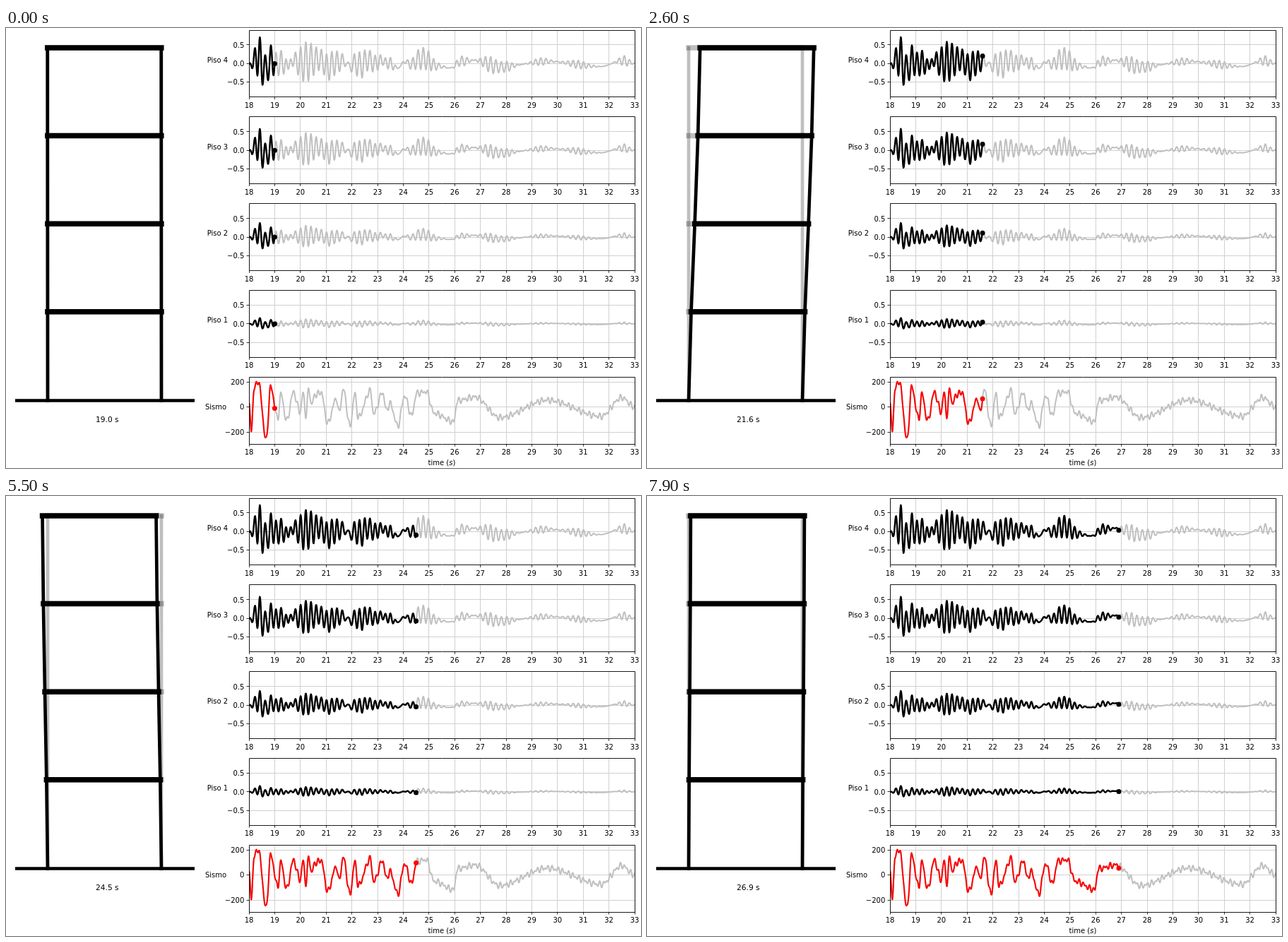
Recreate the animation shown at these times as an HTML page with a canvas. Size 899 px wide and 623 px high, loop 8000 ms.

```html
<!DOCTYPE html>
<html lang="es">
<head>
<meta charset="utf-8">
<title>Sismo</title>
<style>
html, body { margin: 0; width: 100%; height: 100%; overflow: hidden; background: #fff; }
canvas, svg { position: absolute; left: 0; top: 0; width: 899px; height: 623px; }
text { font-family: "DejaVu Sans", Verdana, sans-serif; font-size: 10px; fill: #000; text-anchor: middle; }
</style>
</head>
<body>
<canvas id="stage" width="899" height="623"></canvas>
<svg id="labels" viewBox="0 0 899 623"></svg>
<script>
const ctx = document.getElementById('stage').getContext('2d');
const labels = document.getElementById('labels');

// Main swings of the ground: [seconds, acceleration]
const swings = [
  [0, 20], [.09, -190], [.2, 150], [.36, 208], [.67, -265], [.84, 160], [1.12, -95], [1.24, 105],
  [1.46, -110], [1.75, 130], [1.88, 0], [2.4, 60], [2.8, 120], [3.06, -130], [3.4, 70], [3.5, -45],
  [3.67, 140], [3.93, -155], [4.12, 105], [4.25, -85], [4.72, 130], [4.85, -55], [5.2, 115],
  [5.35, -30], [5.48, 30], [5.79, -152], [6.05, 90], [6.33, -70], [6.52, 110], [6.9, 122],
  [7.2, -50], [7.97, -118], [8.1, 50], [8.8, 80], [9.75, -85], [11.6, 55], [13.7, -75], [14.5, 75],
  [15, 0]
];
// Bursts of vibration of the building: [time of a crest, width, height]
const bursts = [
  [.425, .25, .6], [.853, .2, .38], [1.25, .25, .33], [2.21, .45, .53], [3.22, .55, .36],
  [4.3, .4, .36], [4.91, .35, .2], [5.5, .2, .16], [6.78, .52, .3], [8.28, .3, .14],
  [9.4, .4, .22], [10.03, .3, .13], [11.35, .4, .1], [12.81, .5, .11], [14.6, .25, .14]
];
const PERIOD = .2025;

function swell(t) {
  let i = 1;
  while (i < swings.length - 1 && swings[i][0] < t) i++;
  const [t0, v0] = swings[i - 1], [t1, v1] = swings[i];
  const u = Math.min(1, Math.max(0, (t - t0) / (t1 - t0)));
  return v0 + (v1 - v0) * u * u * (3 - 2 * u);
}

function burst(t, [crest, width, height], period) {
  const d = t - crest;
  return height * Math.exp(-((d / width) ** 2)) * Math.cos(2 * Math.PI * d / period);
}

const ripple = t => 14 * (Math.sin(31 * t) + Math.sin(47 * t + 1));
const ground = t => swell(t) + ripple(t) + burst(t, [2.215, .25, -115], .235);

// The roof drifts with the ground and rings at its own period
function roof(t) {
  const drift = (swell(t - .1) + swell(t) + swell(t + .1)) / 3;
  return bursts.reduce((sum, b) => sum + burst(t, b, PERIOD), .0011 * drift);
}

const LEFT = 344, RIGHT = 890, PX = 36.4, HEIGHT = 94.6, SPAN = 15;
const ratios = [.22, .535, .815, 1];
const plots = [3, 2, 1, 0].map((floor, row) => {
  const top = 3 + row * 122.85;
  return { top, zero: top + HEIGHT / 2, scale: 52.6, ticks: [.5, 0, -.5], digits: 1,
    name: 'Piso ' + (floor + 1), nameX: 299.5, color: '#000', width: 2.4,
    at: t => ratios[floor] * roof(t) };
});
plots.push({ top: 494.4, zero: 536.6, scale: .177, ticks: [200, 0, -200], digits: 0,
  name: 'Sismo', nameX: 297, color: '#f00', width: 2, at: ground });

function label(x, y, str, size, anchor) {
  const el = document.createElementNS('http://www.w3.org/2000/svg', 'text');
  el.setAttribute('x', x);
  el.setAttribute('y', y);
  if (size) el.style.fontSize = size + 'px';
  if (anchor) el.style.textAnchor = anchor;
  el.textContent = str;
  labels.appendChild(el);
  return el;
}

for (const p of plots) {
  for (let s = 0; s <= SPAN; s++) label(LEFT + s * PX, p.top + HEIGHT + 15.2, 18 + s);
  for (const v of p.ticks) {
    const str = v.toFixed(p.digits).replace('-', '\u2212');
    label(337.3, p.zero - v * p.scale + 3.8, str, 0, 'end');
  }
  label(p.nameX, p.top + HEIGHT / 2 - 1.6, p.name);
}
label(617, 618.5, '').innerHTML = 'time (<tspan font-style="italic">s</tspan>)';
const clock = label(143.3, 557.5, '', 10.6);

function line(pts, color, width, cap = 'butt') {
  ctx.strokeStyle = color;
  ctx.lineWidth = width;
  ctx.lineCap = cap;
  ctx.lineJoin = 'round';
  ctx.beginPath();
  pts.forEach(([x, y]) => ctx.lineTo(x, y));
  ctx.stroke();
}

const snap = v => Math.floor(v) + .5;

function trace(p, end, color, width) {
  const n = Math.ceil(end / .015);
  const pts = Array.from({ length: n + 1 }, (_, i) => {
    const t = end * i / n;
    return [LEFT + t * PX, p.zero - p.at(t) * p.scale];
  });
  line(pts, color, width, 'square');
}

function drawPlot(p, now) {
  const bottom = p.top + HEIGHT;
  for (let s = 0; s <= SPAN; s++) {
    const x = snap(LEFT + s * PX);
    line([[x, p.top], [x, bottom]], '#d0d0d0', 1);
    line([[x, bottom], [x, bottom + 3.5]], '#000', .8);
  }
  for (const v of p.ticks) {
    const y = snap(p.zero - v * p.scale);
    line([[LEFT, y], [RIGHT, y]], '#d0d0d0', 1);
    line([[LEFT - 3.5, y], [LEFT, y]], '#000', .8);
  }
  ctx.save();
  ctx.beginPath();
  ctx.rect(LEFT, p.top, RIGHT - LEFT, HEIGHT);
  ctx.clip();
  trace(p, SPAN, '#c0c0c0', 2);
  trace(p, now, p.color, p.width);
  ctx.fillStyle = p.color;
  ctx.beginPath();
  ctx.arc(LEFT + now * PX, p.zero - p.at(now) * p.scale, 3.5, 0, 7);
  ctx.fill();
  ctx.restore();
  ctx.strokeStyle = '#000';
  ctx.lineWidth = .9;
  ctx.strokeRect(snap(LEFT), snap(p.top), RIGHT - LEFT, snap(bottom) - snap(p.top));
}

const COLS = [59, 220], BASE = 527.5, STOREY = 124.6;

function drawFrame(shift, color) {
  const levels = [[0, BASE]];
  ratios.forEach((r, i) => levels.push([r * shift, 401.8 - i * STOREY]));
  for (const x of COLS) line(levels.map(([dx, y]) => [x + dx, y]), color, 4.7, 'square');
  for (const [dx, y] of levels.slice(1)) {
    line([[COLS[0] + dx, y], [COLS[1] + dx, y]], color, 7.5, 'square');
  }
}

function draw(now) {
  ctx.fillStyle = '#fff';
  ctx.fillRect(0, 0, 899, 623);
  ctx.save();
  ctx.beginPath();
  ctx.rect(13, 0, 254, 600);
  ctx.clip();
  drawFrame(0, 'rgba(0,0,0,.25)');
  drawFrame(roof(now) * 80.5, '#000');
  line([[13, BASE], [267, BASE]], '#000', 4.5);
  ctx.restore();
  plots.forEach(p => drawPlot(p, now));
  clock.textContent = (18 + now).toFixed(1) + ' s';
}

const start = performance.now();
let shown = -1;
function tick() {
  const step = Math.floor((performance.now() - start) / 100) % 80;
  if (step !== shown) {
    shown = step;
    draw(1 + step / 10);
  }
  requestAnimationFrame(tick);
}
tick();
</script>
</body>
</html>
```
